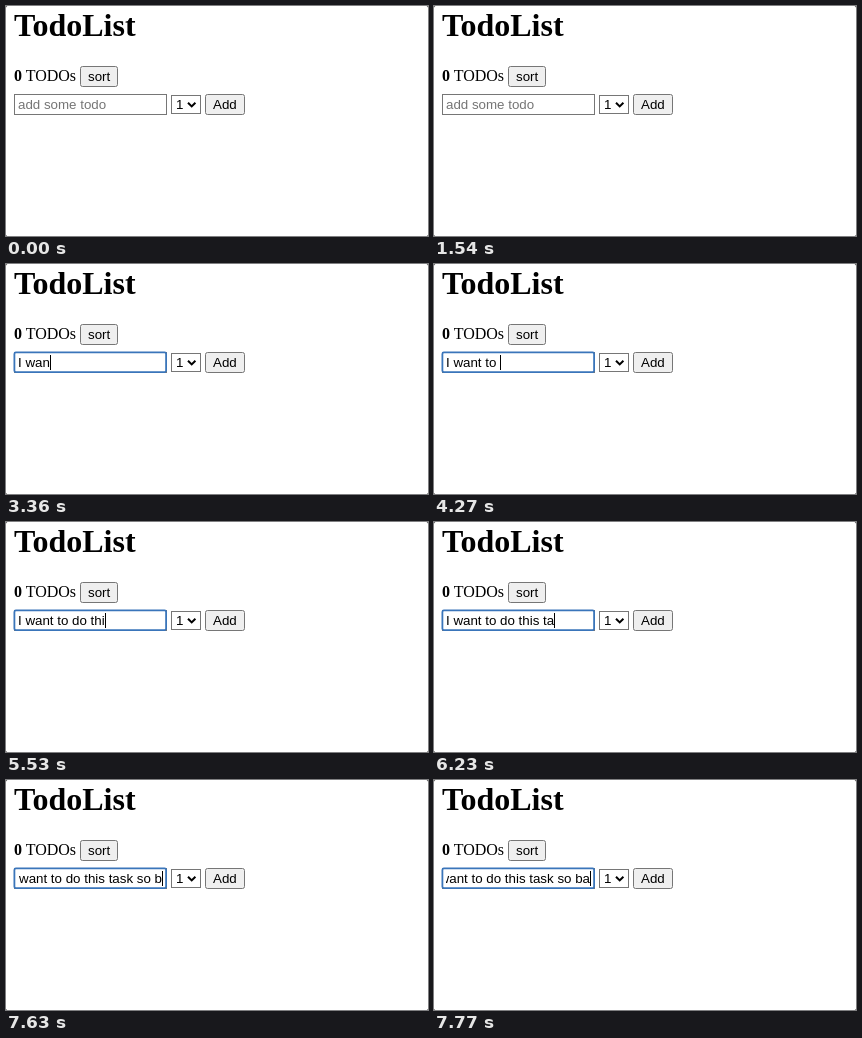
These frames come from a looping animation (422 by 230 pixels, 8 s). An HTML page:

```html
<!DOCTYPE html>
<html lang="en">
<head>
<meta charset="utf-8">
<title>TodoList</title>
<style>
  html, body { margin: 0; height: 100%; overflow: hidden; background: #000; }
  svg { display: block; width: 422px; height: 230px; }
  text { white-space: pre; font: 13.333px "Liberation Sans", Arial, sans-serif; }
  .serif { font: 16px "Liberation Serif", Times, serif; }
  .title { font-size: 32px; font-weight: bold; }
  .bold { font-weight: bold; }
  .box { fill: #fff; stroke: #767676; }
  .button { fill: #efefef; }
  #hint { fill: #757575; }
  #typed { font-kerning: none; }
  #ring { fill: none; stroke: #3a75ba; stroke-width: 1.8; }
</style>
</head>
<body>
<svg viewBox="0 0 422 230">
  <clipPath id="field"><rect x="12" y="90" width="145" height="17"/></clipPath>
  <rect width="422" height="230" rx="1.5" fill="#fff"/>

  <text class="serif title" x="8" y="30">TodoList</text>
  <text class="serif" x="8" y="75"><tspan class="bold">0</tspan> TODOs</text>
  <rect class="box button" x="74.5" y="60.5" width="37" height="20" rx="2"/>
  <text x="82" y="75">sort</text>

  <rect class="box" x="8.5" y="88.5" width="152" height="20"/>
  <rect id="ring" x="8.4" y="88.4" width="151.7" height="19.7" rx="1.5"/>
  <g clip-path="url(#field)">
    <text id="hint" x="12" y="103">add some todo</text>
    <text id="typed" x="12" y="103"></text>
    <rect id="caret" y="91" width="1" height="15"/>
  </g>

  <rect class="box" x="165.5" y="89.5" width="29" height="18"/>
  <text x="170" y="103">1</text>
  <path d="M182 96.7l3.7 3.7 3.7-3.7" fill="none" stroke="#000" stroke-width="2"/>
  <rect class="box button" x="199.5" y="88.5" width="39" height="20" rx="2"/>
  <text x="207" y="103">Add</text>
</svg>
<script>
const LOOP = 8000, FOCUS = 1750, LEFT = 12, RIGHT = 157;
const MESSAGE = "I want to do this task so ba";
// Time of each keystroke in ms
const KEYS = [
  2590, 2730,
  3150, 3220, 3360, 3640, 3780,
  3990, 4130, 4270,
  4970, 5040, 5180,
  5250, 5390, 5530, 5670, 5810,
  6090, 6230, 6370, 6580, 6720,
  7070, 7210, 7350,
  7630, 7770
];
// Spans in which the caret has blinked off
const BLINKS = [[2240, 2590], [4830, 4970]];

const [hint, typed, ring, caret] =
  ["hint", "typed", "ring", "caret"].map(id => document.getElementById(id));
const pen = document.createElement("canvas").getContext("2d");
pen.font = '13.333px "Liberation Sans", Arial, sans-serif';
pen.fontKerning = "none";

const show = (el, on) => el.setAttribute("visibility", on ? "visible" : "hidden");

function draw(now) {
  const t = now % LOOP;
  const text = MESSAGE.slice(0, KEYS.filter(k => k <= t).length);
  const end = LEFT + pen.measureText(text).width;
  const focused = t >= FOCUS;

  typed.textContent = text;
  typed.setAttribute("x", LEFT - Math.max(0, end + 1 - RIGHT));
  caret.setAttribute("x", Math.min(Math.round(end), RIGHT - 1));
  show(hint, !text);
  show(ring, focused);
  show(caret, focused && !BLINKS.some(([from, to]) => t >= from && t < to));
  requestAnimationFrame(draw);
}
draw(performance.now());
</script>
</body>
</html>
```
